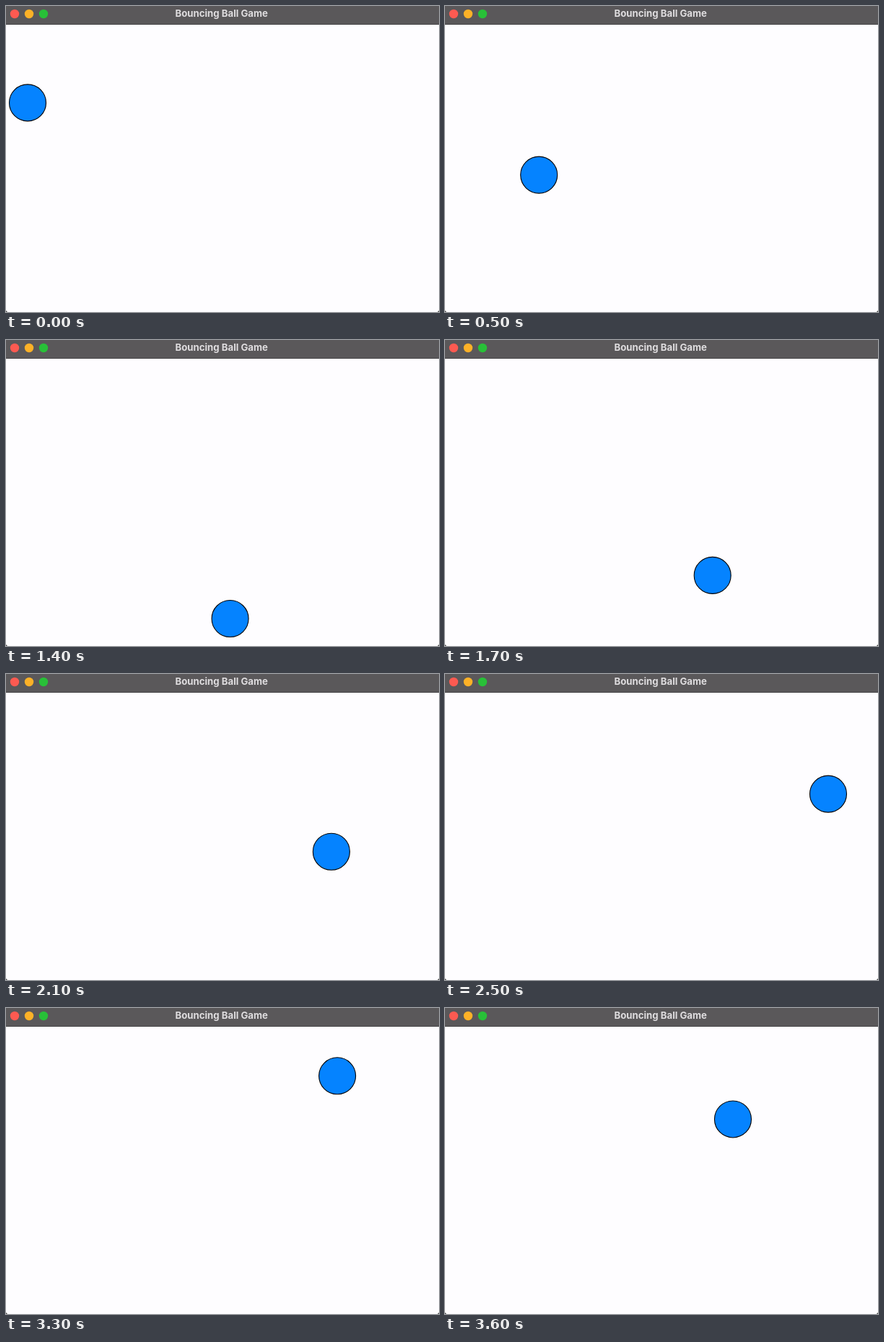
These frames come from a looping animation (600 by 425 pixels, 3700 ms). An HTML page:

```html
<!DOCTYPE html>
<html lang="en">
<head>
<meta charset="utf-8">
<title>Bouncing Ball Game</title>
<style>
  html, body { margin: 0; width: 100%; height: 100%; overflow: hidden; background: #fefdff; }
  svg { display: block; width: 600px; height: 425px; }
  text { font: 700 13.2px Inter, "Open Sans", sans-serif; fill: #dfdddf; }
</style>
</head>
<body>
<svg viewBox="0 0 600 425">
  <rect width="600" height="425" fill="#fefdff"/>
  <rect width="600" height="25" fill="#5a585a"/>
  <rect y="25" width="600" height="1" fill="#474547"/>
  <circle cx="12" cy="11" r="6.2" fill="#fd5a51"/>
  <circle cx="32" cy="11" r="6.2" fill="#fdb127"/>
  <circle cx="52" cy="11" r="6.2" fill="#28c038"/>
  <text x="298.7" y="15.3" text-anchor="middle">Bouncing Ball Game</text>
  <path d="M0 422.5V425H2.5Q.5 424.5 0 422.5M600 422.5V425H597.5Q599.5 424.5 600 422.5" fill="#333"/>
  <circle id="ball" r="25.5" fill="#0583ff" stroke="#000" stroke-width="1.1"/>
</svg>
<script>
  const STEP = 100, STEPS = 37, SPEED = 20.04;
  const START = { x: 30, y: 134.4 };
  const WALL = { right: 575.2, bottom: 401, top: 50.3 };
  const ball = document.getElementById("ball");

  // Folds a straight path back at each wall
  function bounce(pos, min, max) {
    if (pos > max) pos = 2 * max - pos;
    if (pos < min) pos = 2 * min - pos;
    return pos;
  }

  function draw(now) {
    const step = Math.floor(now / STEP) % STEPS;
    const travel = step * SPEED;
    ball.setAttribute("cx", bounce(START.x + travel, 0, WALL.right));
    ball.setAttribute("cy", bounce(START.y + travel, WALL.top, WALL.bottom));
  }

  const begin = performance.now();
  function tick() {
    draw(performance.now() - begin);
    requestAnimationFrame(tick);
  }
  tick();
</script>
</body>
</html>
```
